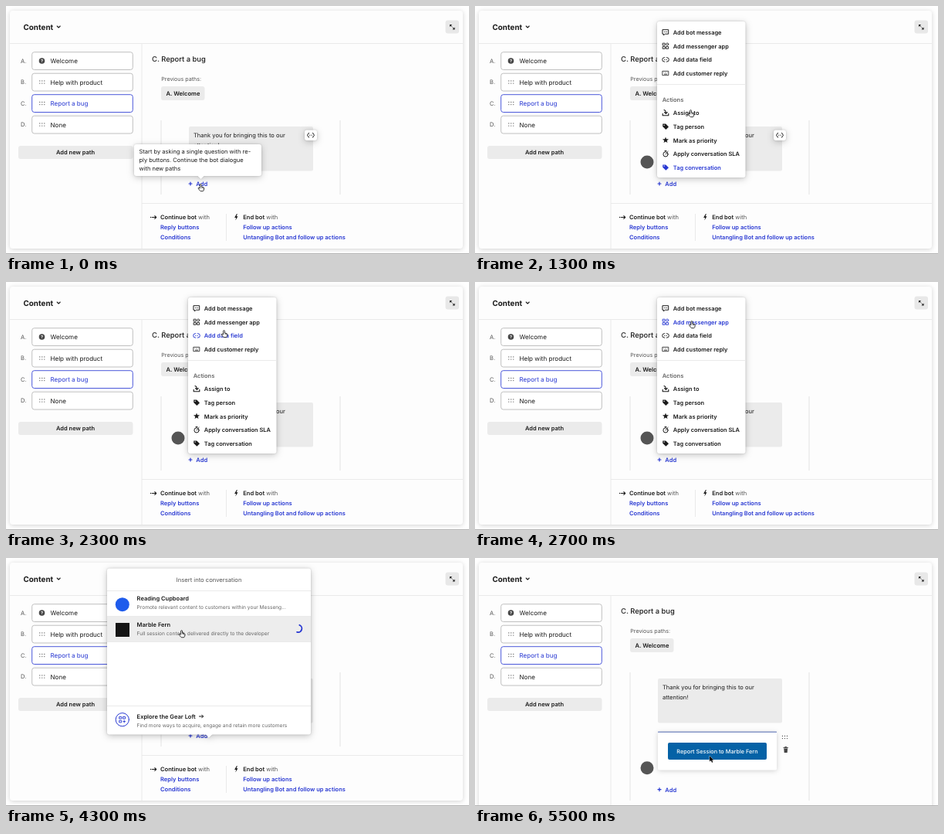
Animation, 600 px wide and 321 px high, one loop 5.6 s. Source, as an HTML page:

```html
<!DOCTYPE html>
<html lang="en">
<head>
<meta charset="utf-8">
<title>Bot path editor</title>
<style>
  html, body { margin: 0; width: 100%; height: 100%; overflow: hidden; background: #fff; }
  svg { display: block; width: 600px; height: 321px; font-family: Inter, "Open Sans", sans-serif; }
  text { fill: currentColor; white-space: pre; text-rendering: geometricPrecision; }
  .card { filter: drop-shadow(0 1px 3px rgba(0,0,0,.18)); }
  .pop { filter: drop-shadow(0 2px 5px rgba(0,0,0,.2)) drop-shadow(0 0 1px rgba(0,0,0,.18)); }
  .line { fill: none; stroke: currentColor; stroke-width: 1; stroke-linejoin: round; stroke-linecap: round; }
</style>
</head>
<body>
<svg id="stage" viewBox="0 0 600 321" width="600" height="321"></svg>
<script>
const LOOP = 5600, STEP = 100;
const INK = '#1b1b1b', BLUE = '#2838d2', GREY = '#666', FILL = '#ebebeb', RULE = '#eaeaea';

// ---- drawing helpers; y of a label is its visual middle ----
const label = (x, y, str, size = 7.55, weight = 600, color = INK, anchor = 'start') =>
  `<text x="${x}" y="${y + size * .39}" font-size="${size}" font-weight="${weight}" ${color && `color="${color}"`} text-anchor="${anchor}">${str}</text>`;
const box = (x, y, w, h, fill, r = 3, extra = '') =>
  `<rect x="${x}" y="${y}" width="${w}" height="${h}" rx="${r}" fill="${fill}" ${extra}/>`;
const hline = (x1, x2, y) => box(x1, y, x2 - x1, 1, RULE, 0);
const vline = (x, y1, y2) => box(x, y1, 1, y2 - y1, RULE, 0);
const line = (d, width = 1) => `<path class="line" d="${d}" style="stroke-width:${width}"/>`;
const solid = d => `<path d="${d}" fill="currentColor"/>`;
const dot = (x, y, r, fill = 'currentColor') => `<circle cx="${x}" cy="${y}" r="${r}" fill="${fill}"/>`;
const at = (x, y, body, color = INK) => `<g transform="translate(${x} ${y})" ${color && `color="${color}"`}>${body}</g>`;
const layer = (id, body) => `<g id="${id}">${body}</g>`;
const bubble = (x, y, w, h, tailX) =>
  `<g class="pop">${box(x, y, w, h, '#fff')}<path d="M${tailX - 4.5} ${y + h - .5}h9l-4.5 4.5Z" fill="#fff"/></g>`;

const grip = [-3, 0, 3].map(x => dot(x, -1.6, .65) + dot(x, 1.6, .65)).join('');
const trash = line('M-2.8-2.6H2.8M-1-3.6H1') + solid('M-2.4-1.7H2.4L2 3.7H-2Z');
const braces = line('M-2.3-2.7Q-3.6-2.7-3.6-1.5T-4.6 0Q-3.6 .3-3.6 1.5T-2.3 2.7M2.3-2.7Q3.6-2.7 3.6-1.5T4.6 0Q3.6 .3 3.6 1.5T2.3 2.7')
  + dot(-1.2, 0, .6) + dot(1.2, 0, .6);

function star(r) {
  const pts = Array.from({ length: 10 }, (_, i) => {
    const a = i * Math.PI / 5 - Math.PI / 2, q = i % 2 ? r * .43 : r;
    return (q * Math.cos(a)).toFixed(2) + ' ' + (q * Math.sin(a)).toFixed(2);
  });
  return solid('M' + pts.join('L') + 'Z');
}

const icons = {
  message: line('M-3.7-3.3H3.7V2.2H-.6L-2.6 3.8V2.2H-3.7Z') + [-1.7, 0, 1.7].map(x => dot(x, -.5, .55)).join(''),
  tiles: line('M-3.5-3.5H-.8V-.8H-3.5ZM-3.5 .9H-.8V3.6H-3.5ZM.9 .9H3.6V3.6H.9Z', .9)
    + '<circle class="line" cx="2.2" cy="-2.2" r="1.5" style="stroke-width:.9"/>',
  field: line('M-1.2-2.7H-1.6A2.7 2.7 0 0 0-1.6 2.7H-1.2M1.2-2.7H1.6A2.7 2.7 0 0 1 1.6 2.7H1.2') + dot(-1.2, 0, .6) + dot(1.2, 0, .6),
  keys: line('M-3.8-2.7H3.8V2.7H-3.8ZM-1.6 1.2H1.6', .8) + [-2.2, -.7, .7, 2.2].map(x => dot(x, -.9, .45)).join(''),
  assign: line('M-2-3.8Q.4-3.4 .4 .8M-1.4-.8L.4 1 2.2-.8M-3.8 1V3.5H3.8V1', 1.1),
  tag: '<path fill="currentColor" fill-rule="evenodd" d="M-3.8-3.4H.2L4 .4 .4 4-3.8-.1ZM-2.5-2.2V-1H-1.3V-2.2Z"/>',
  star: star(4.2),
  watch: '<circle class="line" cx="0" cy=".7" r="3.1"/>' + line('M-1-3.7H1M2.5-2.4L3.1-3M0 .7L1.3-.6')
};
const addTiles = line('M-3.7-3.7H-1.1V-1.1H-3.7ZM1.1-3.7H3.7V-1.1H1.1ZM-3.7 1.1H-1.1V3.7H-3.7ZM1 2.4H3.8M2.4 1V3.8', .9);

// ---- main page ----
const paths = [['A.', 'Welcome'], ['B.', 'Help with product'], ['C.', 'Report a bug'], ['D.', 'None']];
const pathList = paths.map(([letter, name], i) => {
  const y = 71 + i * 27.5, on = i === 2;
  const mark = i
    ? at(46.8, y, grip, '#555')
    : dot(46.5, y, 3.8, '#484848') + label(46.5, y, '?', 5.6, 700, '#fff', 'middle');
  return label(19, y, letter, 7.6, 400, '#555')
    + box(33.7, y - 11.3, 130.6, 22.8, '#fff', 3, `stroke="${on ? '#4b58da' : '#c0c0c0'}"`)
    + mark + label(57.5, y, name, 8.05, 400, on ? BLUE : INK);
}).join('');

const page =
  `<g class="card">${box(5, 6, 587, 308, '#fdfdfd', 4, 'id="sheet"')}</g>`
  + label(22.5, 26.8, 'Content', 9.9, 700)
  + at(68.2, 27, line('M-2-1L0 1 2-1', 1.1))
  + box(569.5, 18.5, 17.5, 17, '#e8e8e8', 3)
  + at(578.3, 27.2, solid('M-3.3-3.3H-.2L-3.3-.2ZM3.3 3.3H.2L3.3 .2Z') + line('M-2-2L-.8-.8M2 2L.8 .8'))
  + hline(5, 592, 48)
  + `<rect id="divider" x="175.5" y="48" width="1" fill="${RULE}"/>`
  + pathList
  + box(16, 181, 148.5, 17, FILL) + label(90, 189.5, 'Add new path', 7.5, 600, INK, 'middle')
  + label(189, 68.5, 'C.', 9.5, 600, '#444') + label(201.3, 68.5, 'Report a bug', 9.4, 500)
  + label(201.3, 94.3, 'Previous paths:', 7.1, 400, '#555')
  + box(201, 104, 56.5, 18, FILL) + label(207.5, 113, 'A. Welcome', 7.6)
  + '<rect class="rail" x="200.5" y="148" width="1" fill="#e3e3e3"/><rect class="rail" x="432.5" y="148" width="1" fill="#e3e3e3"/>'
  + box(237, 156, 161, 57.5, FILL, 2)
  + label(243, 167.3, 'Thank you for bringing this to our', 7.55, 400)
  + label(243, 179.8, 'attention!', 7.55, 400)
  + layer('tail', dot(223, 202, 8.5, '#555')
    + at(239, 230, line('M-2 0H2M0-2V2', 1.2), BLUE) + label(246.3, 230, 'Add', 7.55, 600, BLUE));

const footer = hline(176, 592, 255)
  + vline(285, 269, 304)
  + at(191, 273.5, line('M-1.6 0H3.6M1.8-1.9L3.7 0 1.8 1.9', 1.1) + dot(-3.4, 0, .8))
  + label(200, 273.5, 'Continue bot<tspan font-weight="400" fill="#555"> with</tspan>')
  + label(200, 286.3, 'Reply buttons', 7.55, 600, BLUE)
  + label(200, 298.7, 'Conditions', 7.55, 600, BLUE)
  + at(298.3, 273.3, solid('M.6-4.2L-2.2 .7H-.2L-.9 4.2 2.2-1H.3L1.5-4.2Z'))
  + label(307.3, 273.5, 'End bot<tspan font-weight="400" fill="#555"> with</tspan>')
  + label(307.3, 286.3, 'Follow up actions', 7.55, 600, BLUE)
  + label(307.3, 298.7, 'Untangling Bot and follow up actions', 7.5, 600, BLUE);

const appBlock = `<g class="card">${box(237, 225, 154, 49.5, '#fff', 2)}</g>`
  + box(237, 224.5, 154, 1.5, '#8797c8', .5)
  + box(250, 239, 128, 22, '#0562a6', 2)
  + label(314, 249.8, 'Report Session to Marble Fern', 7.3, 500, '#fff', 'middle');

const tools = at(401.5, 7, grip, '#444') + at(402.7, 23.2, trash, '#444');
const codeButton = `<g class="pop">${box(387, 160.5, 16, 13.5, '#fff', 3)}</g>` + at(395, 167.2, braces);

const tooltip = bubble(166, 179, 165, 41, 252.5)
  + ['Start by asking a single question with re-', 'ply buttons. Continue the bot dialogue', 'with new paths']
    .map((s, i) => label(172.5, 188.3 + i * 11, s, 7.5, 400)).join('');

// ---- menu ----
const items = [
  [34, 'Add bot message', 'message'], [51.7, 'Add messenger app', 'tiles'],
  [69.4, 'Add data field', 'field'], [87, 'Add customer reply', 'keys'],
  [138.3, 'Assign to', 'assign'], [156, 'Tag person', 'tag'],
  [173.6, 'Mark as priority', 'star'], [191.2, 'Apply conversation SLA', 'watch'],
  [208.8, 'Tag conversation', 'tag']
];
const menu = `<g class="pop">${box(236, 20, 114.5, 202, '#fff', 3)}</g>`
  + hline(236, 350.5, 101)
  + label(242.7, 120.6, 'Actions', 7.5, 600, GREY)
  + items.map(([y, name, icon]) =>
    `<g class="item">${at(247, y, icons[icon], '')}${label(256.8, y, name, 7.45, 600, '')}</g>`).join('');

// ---- modal ----
const entry = (y, title, note) => label(169.6, y, title, 7.5) + label(169.6, y + 11.3, note, 6.6, 400, GREY);
const modal = bubble(131, 13.5, 264, 215, 263)
  + label(263, 27.6, 'Insert into conversation', 7.65, 400, '#555', 'middle')
  + layer('hover', box(131, 75, 264, 33.5, '#ededed', 0))
  + [42, 75, 108, 191].map(y => hline(131, 395, y)).join('')
  + dot(150.8, 60.2, 9, '#1f5cec')
  + entry(52.3, 'Reading Cupboard', 'Promote relevant content to customers within your Messeng...')
  + box(142, 84, 18, 18, '#141414', 0)
  + entry(86, 'Marble Fern', 'Full session context, delivered directly to the developer')
  + at(150.8, 209.2, '<circle class="line" r="8.6"/>' + addTiles, BLUE)
  + entry(204.9, 'Explore the Gear Loft', 'Find more ways to acquire, engage and retain more customers')
  + at(253, 205, line('M-2.6 0H2.5M.7-1.9L2.6 0 .7 1.9'))
  + layer('spinner', at(378.7, 91.3,
    '<path id="arc" class="line" d="M1.64-4.51A4.8 4.8 0 0 1-1.64 4.51" style="stroke-width:1.8"/>', BLUE));

const pointer = layer('hand', '<path d="M-1 1A1 1 0 0 1 1 1V3.7L3.5 4.2Q4.8 4.6 4.7 5.8L4.2 8.3Q3.9 9.6 2.7 9.6H.2Q-.7 9.6-1.3 8.7L-3.3 5.9Q-3.7 4.9-2.7 4.8L-1 5.7Z" transform="translate(.5 .6) scale(.94)" fill="#fff" stroke="#111" stroke-width=".9" stroke-linejoin="round"/>'
    + line('M2 4.6V5.9M3.4 4.9V6', .5))
  + layer('arrow', '<path d="M0 .7V8.1L1.8 6.5 3 9.3 4.3 8.7 3.1 6H5.4Z" fill="#000" stroke="#fff" stroke-width=".7" paint-order="stroke"/>');

const stage = document.getElementById('stage');
stage.innerHTML = page
  + layer('footer', footer) + layer('appBlock', appBlock) + layer('tools', tools)
  + layer('code', codeButton) + layer('tooltip', tooltip) + layer('menu', menu) + layer('modal', modal)
  + box(0, 320, 600, 1, '#b4b4b4', 0) + layer('pointer', pointer);

// ---- timeline ----
const track = [ // ms, x, y
  [0, 251.8, 230], [300, 251.8, 230], [400, 253, 228], [500, 262, 214], [600, 274, 199], [700, 282, 176],
  [800, 283, 160], [900, 283, 158], [1000, 282, 170], [1100, 281, 196], [1200, 280, 205], [1300, 279, 134],
  [1400, 280, 85], [1500, 281, 66], [1700, 282, 49], [1900, 282, 60], [2100, 282, 64], [2300, 282, 62],
  [2500, 281, 50], [2800, 280, 50], [3000, 262, 90], [3200, 241.5, 123], [3300, 241, 122], [3500, 235, 108],
  [3700, 227.5, 94], [4400, 227, 93], [4700, 229, 108], [5000, 243, 160], [5200, 278, 222], [5400, 302, 252],
  [5500, 304, 255.5]
];
function cursorAt(t) {
  const i = track.findIndex(k => k[0] > t);
  if (i < 0) return track[track.length - 1].slice(1);
  const [t0, x0, y0] = track[i - 1], [t1, x1, y1] = track[i];
  const p = (t - t0) / (t1 - t0);
  return [x0 + (x1 - x0) * p, y0 + (y1 - y0) * p];
}

const el = id => document.getElementById(id);
const show = (id, on) => { el(id).style.display = on ? '' : 'none'; };
const within = (t, a, b) => t >= a && t < b;
const itemEls = [...document.querySelectorAll('.item')];
const rails = [...document.querySelectorAll('.rail')];
const MENU = 300, MODAL = 2800, DONE = 4600;

function render(t) {
  const done = t >= DONE;
  show('tooltip', t < MENU);
  show('menu', within(t, MENU, MODAL));
  show('modal', within(t, MODAL, DONE));
  show('hover', t >= 3500);
  show('spinner', t >= 3900);
  show('code', t < 1700 || within(t, MODAL, 3500));
  show('footer', !done);
  show('appBlock', done);
  show('tools', t >= 4900);
  el('tools').setAttribute('transform', `translate(0 ${t < 5300 ? 156 : 225})`);
  el('tail').setAttribute('transform', `translate(0 ${done ? 69.7 : 0})`);
  el('sheet').setAttribute('height', done ? 330 : 308);
  el('divider').setAttribute('height', done ? 272 : 266);
  rails.forEach(r => r.setAttribute('height', done ? 166 : 96));
  el('arc').setAttribute('transform', `rotate(${(t - 4300) * .36})`);

  // the highlight trails the pointer by one step
  const hoverY = cursorAt(Math.max(0, t - STEP))[1];
  itemEls.forEach((g, i) => g.setAttribute('color', Math.abs(items[i][0] - hoverY) < 8.8 ? BLUE : INK));

  const [x, y] = cursorAt(t);
  const arrow = within(t, MODAL, 3500) || done;
  el('pointer').setAttribute('transform', `translate(${x} ${y})`);
  show('arrow', arrow);
  show('hand', !arrow);
}

const start = performance.now();
function tick() {
  const t = (performance.now() - start) % LOOP;
  render(Math.floor(t / STEP) * STEP);
  requestAnimationFrame(tick);
}
tick();
</script>
</body>
</html>
```
